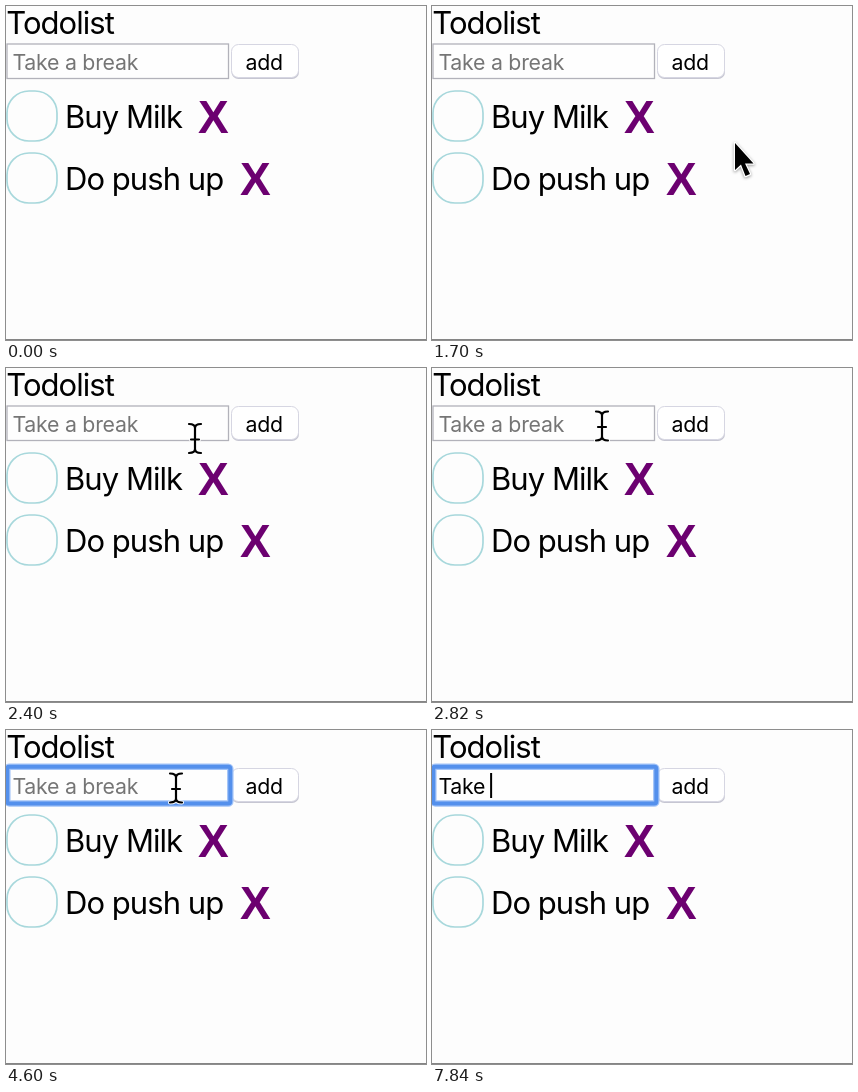
Animation, 420 px wide and 334 px high, one loop 8 s. Source, as an HTML page:

```html
<!DOCTYPE html>
<html lang="en">
<head>
<meta charset="utf-8">
<title>Todolist</title>
<style>
  html, body { margin: 0; width: 100%; height: 100%; overflow: hidden; background: #fdfdfd; }
  svg { display: block; width: 420px; height: 334px; }
  text { font: 31px Inter, sans-serif; font-optical-sizing: none; letter-spacing: -0.95px; white-space: pre; }
  .small { font-size: 21.3px; letter-spacing: -0.25px; }
  .cross { font: bold 46px "Liberation Sans", Arial, sans-serif; letter-spacing: 0; fill: #6c0070; }
  .cross.hover { fill: #fb0a00; }
  .box { fill: #fdfdfd; stroke: #a8d8dc; stroke-width: 1.7; }
  .cursor { stroke-linejoin: round; stroke-linecap: round; }
  #arrow, #hand { filter: drop-shadow(0 1.5px 1.5px rgba(0, 0, 0, .4)); }
</style>
</head>
<body>
<svg viewBox="0 0 420 334">
  <defs>
    <path id="beamShape" d="M-6-14Q0-14 0-10Q0-14 6-14M0-10V11M-6 15Q0 15 0 11Q0 15 6 15M-4 1.500H4"/>
  </defs>
  <rect width="420" height="334" fill="#fdfdfd"/>
  <rect y="333" width="420" height="1" fill="#858585"/>
  <text x="0.3" y="28">Todolist</text>

  <rect x="225.5" y="40" width="67.5" height="33" rx="7" fill="#c6c6d2"/>
  <rect x="225.5" y="38.5" width="67" height="33" rx="7" fill="#fff" stroke="#d6d6e2"/>
  <text class="small" x="239.5" y="64">add</text>

  <rect x="1" y="38" width="221.5" height="34.5" fill="#fefefe" stroke="#b2b2ba" stroke-width="1.3"/>
  <g id="ring" fill="none">
    <rect id="glow" stroke="#a3c4f8" stroke-width="6.5"/>
    <rect id="core" stroke="#5490ec" stroke-width="4"/>
  </g>
  <text id="hint" class="small" x="6.4" y="64" fill="#757575">Take a break</text>
  <text id="typed" class="small" x="6.4" y="64"></text>
  <rect id="caret" y="43" width="2" height="25"/>

  <rect class="box" x="1" y="85" width="50" height="50" rx="22"/>
  <text x="59" y="122">Buy Milk</text>
  <text id="firstCross" class="cross" x="192" y="127">X</text>
  <rect class="box" x="1" y="147" width="50" height="50" rx="22"/>
  <text x="59" y="184">Do push up</text>
  <text class="cross" x="234" y="189">X</text>

  <g id="arrow" class="cursor">
    <path d="M0 0V27L6 21.500L10.500 33L15 31L10 20.500H18.500Z" stroke="#fff" stroke-width="2.500" paint-order="stroke"/>
  </g>
  <g id="hand" class="cursor" fill="#fff" stroke="#000" stroke-width="2">
    <path d="M-2 2Q-1-1 2 1L6 11Q9 8 11 11Q14 9 16 12Q20 11 20 16Q21 23 17 28V32H3V28Q-2 24-7 17Q-7 13-3 15L1 18Z"/>
    <path d="M6 18V25M10.500 18V25M15 18V25" stroke-width="1.700"/>
  </g>
  <g id="beam" class="cursor" fill="none">
    <use href="#beamShape" stroke="#fff" stroke-width="4"/>
    <use href="#beamShape" stroke="#000" stroke-width="2.2"/>
  </g>
</svg>
<script>
  const LOOP = 8000;
  const $ = id => document.getElementById(id);

  // Pointer hot spot: time, x, y
  const path = [
    [1660, 358, 177], [1700, 303, 137], [1800, 303, 137],
    [1980, 218, 110], [2120, 207, 103], [2220, 207, 103],
    [2400, 189, 70], [2500, 189, 70], [2820, 170, 57.5]
  ];
  const typing = [[0, ''], [5880, 'T'], [6700, 'Ta'], [7020, 'Tak'], [7420, 'Take'], [7840, 'Take ']];
  const focusTimes = [3200, 5480];
  const ringSteps = [[0, 7, 0.3], [60, 3, 0.65], [120, 0, 1]];

  const latest = (steps, t) => steps.filter(s => s[0] <= t).pop();
  const show = (id, on) => $(id).setAttribute('visibility', on ? 'visible' : 'hidden');
  const set = (id, attrs) => {
    for (const name in attrs) $(id).setAttribute(name, attrs[name]);
  };
  const inside = ([x, y], left, top, right, bottom) =>
    x >= left && x <= right && y >= top && y <= bottom;

  function pointerAt(t) {
    const from = latest(path, t);
    const to = path[path.indexOf(from) + 1];
    if (!to) return from.slice(1);
    const k = (t - from[0]) / (to[0] - from[0]);
    const eased = k * (2 - k);
    return [1, 2].map(i => from[i] + (to[i] - from[i]) * eased);
  }

  function drawPointer(t) {
    let shape = '';
    if (t >= path[0][0] && t < 5880) {
      const spot = pointerAt(t);
      shape = inside(spot, 192, 92, 223, 130) ? 'hand'
        : inside(spot, 0, 37, 223, 73) ? 'beam' : 'arrow';
      set(shape, { transform: `translate(${spot})` });
    }
    ['arrow', 'hand', 'beam'].forEach(id => show(id, id === shape));
    $('firstCross').classList.toggle('hover', shape === 'hand');
  }

  function drawRing(t) {
    const start = focusTimes.filter(s => s <= t).pop();
    show('ring', start !== undefined);
    if (start === undefined) return;
    const [, spread, opacity] = latest(ringSteps, t - start);
    const frame = {
      x: 1.3 - spread, y: 36.7 - spread,
      width: 223 + 2 * spread, height: 36.8 + 2 * spread, rx: 2 + spread
    };
    set('glow', frame);
    set('core', frame);
    set('ring', { opacity });
  }

  function drawInput(t) {
    const value = latest(typing, t)[1];
    $('typed').textContent = value;
    show('hint', !value);
    const width = value ? $('typed').getComputedTextLength() : 0;
    set('caret', { x: 5.6 + width });
    show('caret', (t >= 3340 && t < 4600) || t >= 5480);
  }

  const began = performance.now();
  function draw() {
    const t = (performance.now() - began) % LOOP;
    drawPointer(t);
    drawRing(t);
    drawInput(t);
    requestAnimationFrame(draw);
  }
  draw();
</script>
</body>
</html>
```
